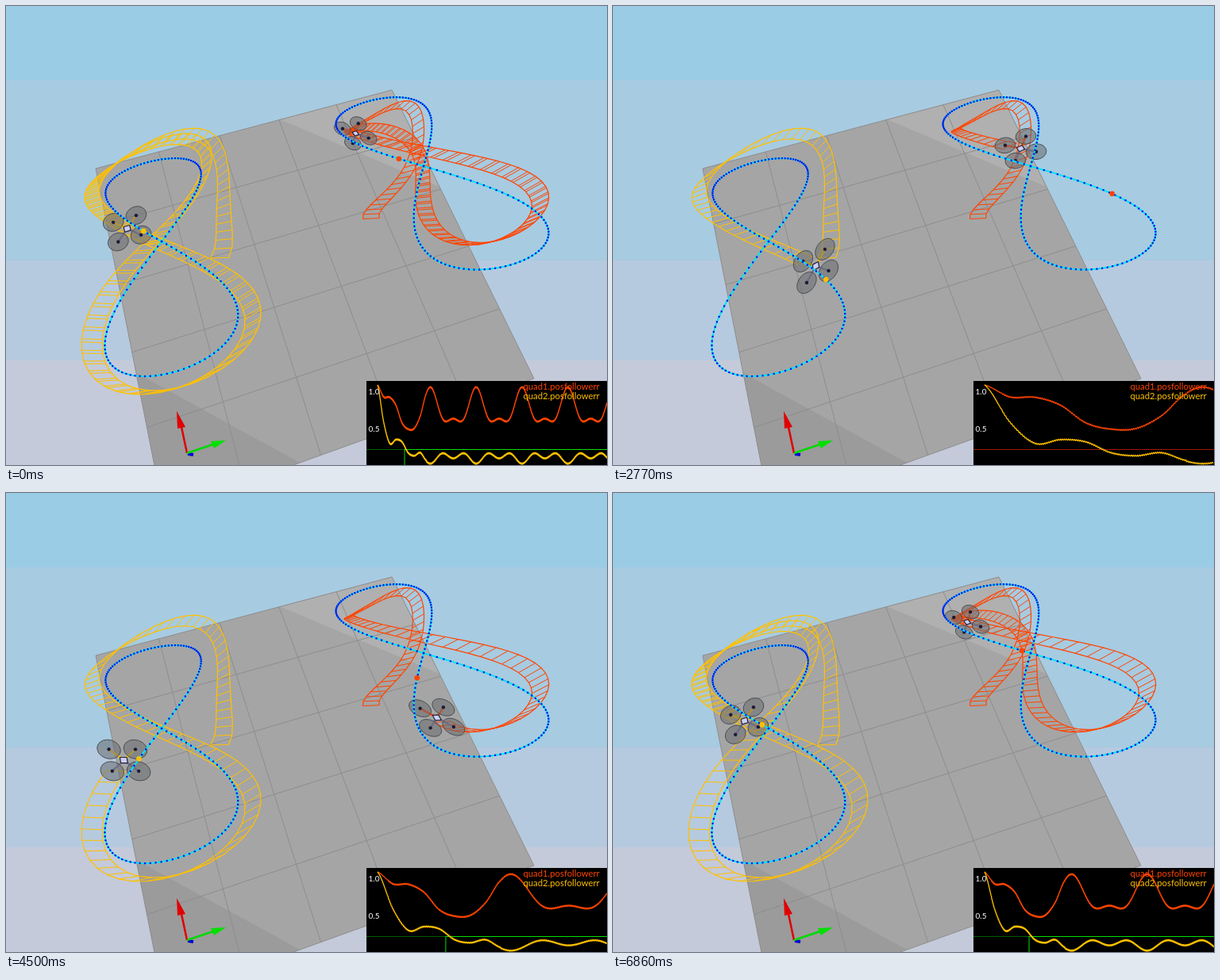
An HTML page with a canvas that plays this animation: 757 px wide and 579 px high, repeating every 6.96 s.

```html
<!DOCTYPE html>
<html>
<head>
<meta charset="utf-8">
<title>Two quadcopters following a figure eight</title>
<style>
html, body { margin: 0; width: 100%; height: 100%; overflow: hidden; background: #a8cbe1; }
canvas { display: block; }
</style>
</head>
<body>
<canvas id="stage" width="757" height="579"></canvas>
<script>
const ctx = document.getElementById('stage').getContext('2d');
const TAU = 2 * Math.PI;
const LOOP = 6960, LAP = 4500, START = 30, STEP = 57.9;
const CROSSING = 2400;   // when the targets pass the middle of their eights
const RED = '#ff4400', YELLOW = '#ffc000';

// plane: perspective of the eight; lap and tilt: points at equal times round a lap;
// launch: offset at take-off; swing: overshoot after it
const drones = [
  {
    color: YELLOW,
    plane: [196, 297, -30, 73.5, 55, -12.5, -.235, .02],
    lean: y => -16 + .035 * y,
    lap: [[173, 291], [288, 349], [275, 452], [130, 474], [133, 358], [225, 253], [244, 174], [150, 191], [110, 246]],
    tilt: [[20, -7], [21, -11], [26, 1], [14, -10], [15, -10]],
    launch: [113, -10],
    swing: [10, -7]
  },
  {
    color: RED,
    plane: [526, 202, -24, 62.3, 56, -18, -.21, 0],
    lean: () => -13,
    lap: [[450, 164], [553, 188], [665, 228], [640, 287], [553, 291], [525, 233], [514, 176], [464, 153], [433, 155]],
    tilt: [[15, -5], [21, -12], [21, -3], [17, -5], [10, -9]],
    launch: [-79, -11],
    swing: [18, -33]
  }
];

// Each error settles from a few opening values into two harmonics
const SETTLE = 300;
const errors = [
  {
    color: RED,
    opening: [1.08, .92, .915, .81, .575, .49, .5, .67, .97],
    steady: a => .745 + .21 * Math.cos(a) + .095 * Math.cos(2 * a)
  },
  {
    color: YELLOW,
    opening: [1.08, .585, .3, .35, .32, .175, .135, .175, .07],
    steady: a => .115 - .035 * Math.cos(a) - .05 * Math.cos(2 * a)
  }
];

// Smooth periodic curve through an odd number of evenly timed points
function around(points, cycle) {
  const n = points.length, sum = [0, 0];
  points.forEach((p, i) => {
    const half = Math.PI * (cycle - i / n), s = Math.sin(half);
    const weight = Math.abs(s) < 1e-9 ? 1 : Math.sin(n * half) / (n * s);
    sum[0] += weight * p[0];
    sum[1] += weight * p[1];
  });
  return sum;
}

// Catmull-Rom through evenly spaced values
function through(values, x) {
  const i = Math.floor(x), s = x - i;
  const [a, b, c, d] = [i - 1, i, i + 1, i + 2]
    .map(j => values[Math.min(values.length - 1, Math.max(0, j))]);
  return b + s / 2 * (c - a + s * (2 * a - 5 * b + 4 * c - d + s * (3 * (b - c) + d - a)));
}

function project([x, y, a, b, d, e, g, h], u, v) {
  const w = 1 + g * u + h * v;
  return [(x + a * u + b * v) / w, (y + d * u + e * v) / w];
}

function path(points, close) {
  ctx.beginPath();
  points.forEach(p => ctx.lineTo(p[0], p[1]));
  if (close) ctx.closePath();
}

function fill(color, ...points) {
  path(points, true);
  ctx.fillStyle = color;
  ctx.fill();
}

function line(color, width, ...points) {
  path(points);
  ctx.strokeStyle = color;
  ctx.lineWidth = width;
  ctx.stroke();
}

function dot(color, x, y, r) {
  ctx.beginPath();
  ctx.arc(x, y, r, 0, 7);
  ctx.fillStyle = color;
  ctx.fill();
}

function drawWorld() {
  [[0, '#9bcce5'], [94, '#a7cbe1'], [321, '#b6cadf'], [447, '#c4cad9']].forEach(([y, color]) => {
    ctx.fillStyle = color;
    ctx.fillRect(0, y, 757, 579 - y);
  });
  const floor = [113, 205, 413.1, 39.4, -90.3, 284.9, .0825, -.2321];
  const at = (u, v) => project(floor, u, v);
  fill('#a5a5a5', at(0, 0), at(1, 0), at(1, 1), at(0, 1));
  fill('#b0b0b0', [345, 143], at(1, 0), [546, 228]);
  fill('#9b9b9b', [164, 463], at(0, 1), [362, 579], [370, 576]);
  for (let i = 0; i <= 5; i++) {
    line('#8d8d8d', 1, at(i / 5, 0), at(i / 5, 1));
    line('#8d8d8d', 1, at(0, i / 5), at(1, i / 5));
  }
  line('#0000d0', 4, [229, 565], [236, 566]);
  line('#e00000', 2.5, [228, 564], [221, 531]);
  fill('#e00000', [215, 511], [216, 533], [226, 531]);
  line('#00d800', 2.5, [228, 564], [261, 553]);
  fill('#00e000', [277, 548], [258, 549], [262, 558]);
}

// Centre of a drone and the vector across it
function pose(drone, t) {
  const cycle = (t - CROSSING) / LAP, age = t - START;
  const fade = Math.exp(-Math.pow(age / 420, 1.4));
  const bump = Math.exp(-Math.pow((age - 1130) / 350, 2));
  const [x, y] = around(drone.lap, cycle).map((c, k) =>
    c + drone.launch[k] * fade + drone.swing[k] * bump);
  return [x, y, ...around(drone.tilt, cycle)];
}

function drawTrail(drone, now) {
  const left = [], right = [];
  for (let t = START; t <= now; t += STEP) {
    const [x, y, wx, wy] = pose(drone, t);
    left.push([x - wx / 2, y - wy / 2]);
    right.push([x + wx / 2, y + wy / 2]);
  }
  line(drone.color, 1.2, ...left);
  line(drone.color, 1.2, ...right);
  left.forEach((p, i) => line(drone.color, 1, p, right[i]));
}

function drawDrone(drone, now) {
  const [x, y, wx, wy] = pose(drone, now);
  const sx = wx / .7, sy = wy / .7;
  const rx = drone.lean(y), ry = -10 - .052 * y;
  const at = (a, b) => [x + a * sx + b * rx, y + a * sy + b * ry];
  for (const [a, b] of [[.5, -.5], [-.5, -.5], [-.5, .5], [.5, .5]]) {
    const [px, py] = at(a, b);
    line(b > 0 ? drone.color : '#77759c', 2.5, [x, y], [px, py]);
    ctx.save();
    ctx.transform(sx * .44, sy * .44, rx * .44, ry * .44, px, py);
    ctx.beginPath();
    ctx.arc(0, 0, 1, 0, 7);
    ctx.restore();
    ctx.fillStyle = 'rgba(105,108,112,.55)';
    ctx.fill();
    ctx.strokeStyle = '#4c4f52';
    ctx.lineWidth = 1;
    ctx.stroke();
    dot('#1c1c38', px, py, 2.2);
  }
  const box = [[-.13, -.13], [.13, -.13], [.13, .13], [-.13, .13]].map(c => at(...c));
  fill('#ccd0f4', ...box);
  line('#22223c', 1.2, ...box, box[0]);
}

function eight(drone, cycle) {
  const a = TAU * cycle;
  return project(drone.plane, Math.sin(a), Math.sin(2 * a));
}

function drawTarget(drone, now) {
  const points = [];
  for (let i = 0; i <= 160; i++) points.push(eight(drone, i / 160));
  line('#00e4f4', 2, ...points);
  ctx.fillStyle = '#0010e8';
  points.forEach(([x, y]) => ctx.fillRect(x - 1.1, y - 1.1, 2.2, 2.2));
  dot(drone.color, ...eight(drone, (now - CROSSING) / LAP), 3.3);
}

function errorAt(curve, t) {
  const x = t / SETTLE;
  return x < curve.opening.length - 1
    ? through(curve.opening, x)
    : curve.steady(TAU * (t - 2590) / (LAP / 2));
}

function drawChart(now) {
  const span = Math.max(12, now - START), width = now < 1600 ? 272 : 289;
  const series = errors.map(curve => {
    const values = [];
    for (let t = 0, i = 0; t <= span; t += 12, i++) {
      const jitter = t > 200 ? .008 * (i % 2 * 2 - 1) : 0;
      values.push([t, errorAt(curve, t) + jitter]);
    }
    return values;
  });
  const low = Math.min(...series.flat().map(p => p[1]));
  const range = Math.max(.15, 1.08 - low);
  const X = t => 468 + t / span * width;
  const Y = v => 478 + (1.08 - v) / range * 100;

  ctx.save();
  ctx.beginPath();
  ctx.rect(454, 473, 303, 106);
  ctx.clip();
  ctx.fillStyle = '#000';
  ctx.fillRect(454, 473, 303, 106);

  const limit = Math.round(Y(.22)) + .5, settled = X(1325);
  if (now < 4400) {
    line('#a01408', 1, [454, limit], [757, limit]);
  } else {
    line('#005c00', 1, [454, limit], [settled, limit]);
    line('#00e000', 1, [settled, 579], [settled, limit], [757, limit]);
  }
  series.forEach((values, i) =>
    line(errors[i].color, 1.3, ...values.map(([t, v]) => [X(t), Y(v)])));

  ctx.fillStyle = '#fff';
  ctx.font = '10px Lato, sans-serif';
  const tick = range < .85 ? .2 : .5;
  for (let v = 1; v > .1; v -= tick) ctx.fillText(v.toFixed(1), 456.5, Y(v) + 4);
  ctx.font = '11.3px Lato, sans-serif';
  errors.forEach((curve, i) => {
    ctx.fillStyle = curve.color;
    ctx.fillText(`quad${i + 1}.posfollowerr`, 651.5, 484 + 12 * i);
  });
  ctx.restore();
}

// The loop opens on a brief late moment, then the flight starts afresh
function simTime(t) {
  if (t < START) return 11290;
  return START + STEP * Math.floor((t - START) / STEP + .4);
}

let shown = -1;
const began = performance.now();

function frame() {
  const now = simTime((performance.now() - began) % LOOP);
  if (now !== shown) {
    shown = now;
    ctx.lineJoin = 'round';
    drawWorld();
    for (const draw of [drawTrail, drawDrone, drawTarget]) drones.forEach(d => draw(d, now));
    drawChart(now);
  }
  requestAnimationFrame(frame);
}
frame();
</script>
</body>
</html>
```
